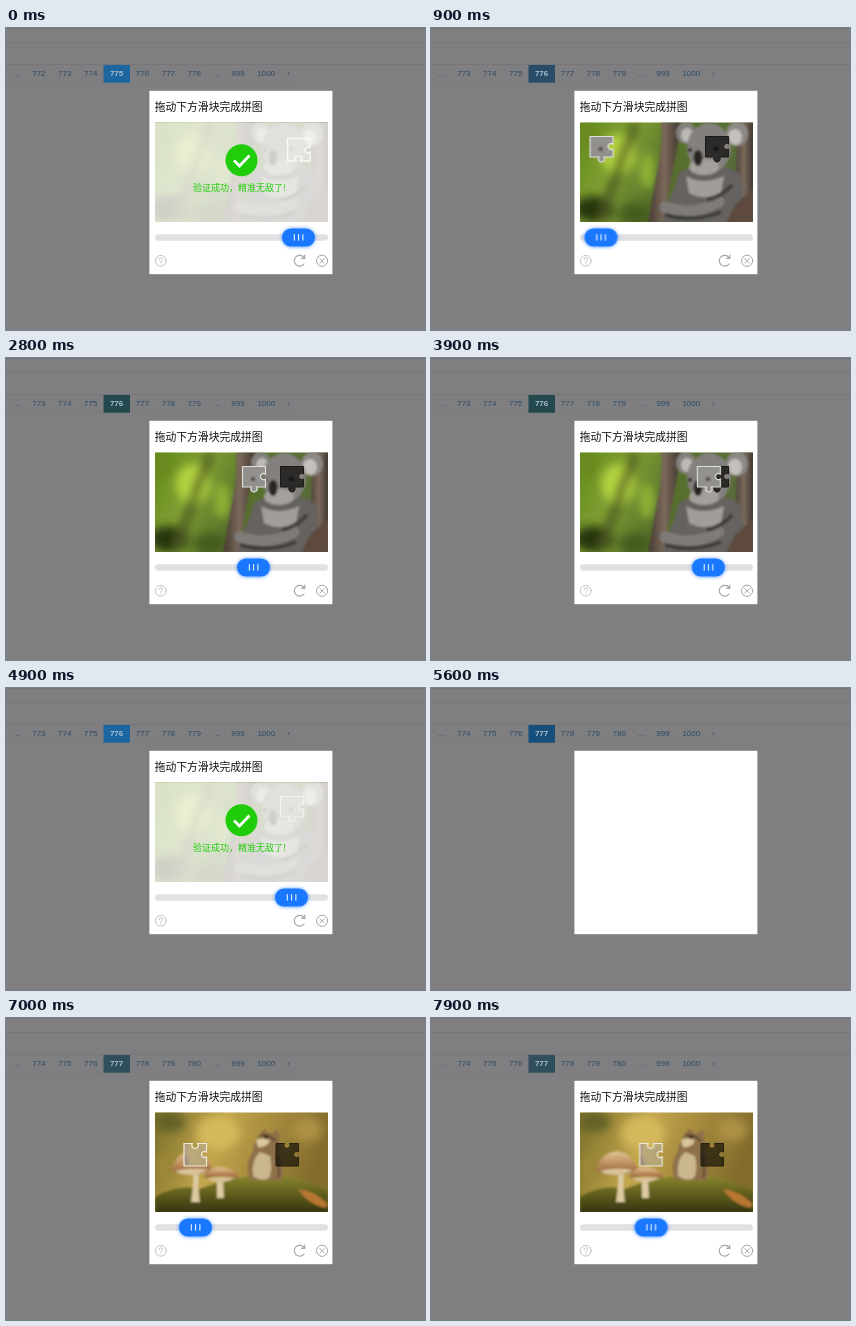
These frames come from a looping animation (419x302 px, 8 s). An HTML page:

```html
<!DOCTYPE html>
<html lang="zh">
<head>
<meta charset="utf-8">
<title>滑块拼图</title>
<style>
html, body { margin: 0; width: 100%; height: 100%; overflow: hidden; background: #7f7f81; }
svg { display: block; width: 419px; height: 302px; }
.pages text { font: 8px "Liberation Sans", Arial, sans-serif; text-anchor: middle; fill: #2b4a66; }
.pages .on { font-weight: bold; fill: #a9bccb; }
.zh { font-family: "Noto Sans CJK SC", "Noto Sans CJK", "Noto Sans", sans-serif; }
.icon { fill: none; stroke: #a6a6a6; stroke-width: 1; stroke-linecap: round; }
.help { stroke: #c2c2c2; }
.first, .second, .third, .p775, .p776, .p777, .tools, .done, .tab, .move {
  animation: 8s -10ms step-end infinite;
}
.p775, .first { animation-name: first; }
.p776 { animation-name: page2; }
.p777 { animation-name: page3; }
.second { animation-name: second; }
.third { animation-name: third; }
.tools { animation-name: tools; }
.done { animation-name: done; }
.tab { animation-name: tab; }
.move { animation-name: move; }
@keyframes first { 0% { opacity: 1 } 3.75%, 100% { opacity: 0 } }
@keyframes page2 { 0% { opacity: 0 } 3.75% { opacity: 1 } 70%, 100% { opacity: 0 } }
@keyframes page3 { 0% { opacity: 0 } 70%, 100% { opacity: 1 } }
@keyframes second { 0% { opacity: 0 } 7.5% { opacity: 1 } 70%, 100% { opacity: 0 } }
@keyframes third { 0% { opacity: 0 } 75%, 100% { opacity: 1 } }
@keyframes tools {
  0% { opacity: 1 } 3.75% { opacity: 0 } 7.5% { opacity: 1 }
  70% { opacity: 0 } 75%, 100% { opacity: 1 }
}
@keyframes done {
  0% { opacity: 1 } 3.75% { opacity: 0 }
  56.25% { opacity: .5 } 57.5% { opacity: 1 } 70%, 100% { opacity: 0 }
}
@keyframes tab {
  0% { fill: #1c66a2 } 3.75% { fill: #174f7c } 7.5% { fill: #2a4c68 } 30% { fill: #23484e }
  56.25% { fill: #1c66a2 } 70% { fill: #174f7c } 75%, 100% { fill: #314e5c }
}
/* drag distance, advancing every 100 ms */
@keyframes move {
  0% { transform: translateX(127px) }
  3.75% { transform: translateX(0) }
  10% { transform: translateX(0); animation-timing-function: steps(11) }
  23.75% { transform: translateX(49.5px); animation-timing-function: steps(9) }
  35% { transform: translateX(82px); animation-timing-function: steps(14) }
  52.5% { transform: translateX(120px) }
  70% { transform: translateX(0) }
  78.75% { transform: translateX(0); animation-timing-function: steps(7) }
  87.5% { transform: translateX(24px); animation-timing-function: steps(10) }
  100% { transform: translateX(58px) }
}
</style>
</head>
<body>
<svg viewBox="0 0 419 302">
  <defs>
    <filter id="soft" x="-30%" y="-30%" width="160%" height="160%"><feGaussianBlur stdDeviation="5"/></filter>
    <filter id="fur" x="-20%" y="-20%" width="140%" height="140%"><feGaussianBlur stdDeviation=".8"/></filter>
    <filter id="glow" x="-20%" y="-40%" width="140%" height="180%"><feGaussianBlur stdDeviation="1.8"/></filter>
    <linearGradient id="leaves" x2="1" y2=".3">
      <stop stop-color="#648a1c"/><stop offset=".3" stop-color="#7f9f33"/>
      <stop offset=".6" stop-color="#56702c"/><stop offset="1" stop-color="#586a3c"/>
    </linearGradient>
    <linearGradient id="bark"><stop stop-color="#453a31"/><stop offset=".5" stop-color="#7c6a5c"/><stop offset="1" stop-color="#3b322b"/></linearGradient>
    <linearGradient id="gold" x2="1" y2=".2">
      <stop stop-color="#7a702b"/><stop offset=".4" stop-color="#c2a54c"/><stop offset=".7" stop-color="#a4893c"/><stop offset="1" stop-color="#826c2d"/>
    </linearGradient>
    <linearGradient id="moss" x2="0" y2="1"><stop stop-color="#8d8a32"/><stop offset=".45" stop-color="#65631f"/><stop offset="1" stop-color="#33330f"/></linearGradient>
    <linearGradient id="cap" x2="0" y2="1"><stop stop-color="#e3c598"/><stop offset=".6" stop-color="#b98758"/><stop offset="1" stop-color="#875d39"/></linearGradient>
    <clipPath id="frame"><rect x="149" y="94.5" width="173" height="99.5"/></clipPath>

    <path id="pieceA" d="M274.5 108.5h23v7.5a3.1 3.1 0 1 0 0 5v8h-9a3.1 3.1 0 1 1-5 0h-9z"/>
    <path id="pieceB" d="M270 125.5h8.5a3.1 3.1 0 1 0 5 0h9v8.5a3.1 3.1 0 1 0 0 5v9h-22.5z"/>
    <clipPath id="cutA"><use href="#pieceA"/></clipPath>
    <clipPath id="cutB"><use href="#pieceB"/></clipPath>

    <g id="koala" clip-path="url(#frame)">
      <path fill="url(#leaves)" d="M149 94h173v100H149z"/>
      <g filter="url(#soft)">
        <ellipse cx="187" cy="126" rx="17" ry="20" fill="#b3d33f"/>
        <ellipse cx="216" cy="143" rx="8" ry="18" fill="#8fb236"/>
        <ellipse cx="157" cy="108" rx="10" ry="13" fill="#69891f"/>
        <ellipse cx="163" cy="181" rx="20" ry="13" fill="#28350e"/>
        <ellipse cx="204" cy="186" rx="16" ry="11" fill="#455b1c"/>
        <path fill="none" stroke="#4f5a24" stroke-width="8" d="M205 94l-14 36-20 60"/>
      </g>
      <g filter="url(#fur)">
        <path fill="url(#bark)" d="M307 94h16v101h-20z"/>
        <path fill="#65625f" d="M247 146C260 134 301 134 310 148L316 195H226C234 177 244 167 247 146z"/>
        <path fill="#a19d98" d="M255 148q17 10 38 0l-3 18q-18 7-32-1z"/>
        <path fill="url(#bark)" d="M230 94h20q-3 22-7 42l-11 58h-15l10-54q5-24 3-46z"/>
        <path fill="#5d4a3c" d="M323 160l-19 17-9 18h28z"/>
        <ellipse cx="255" cy="105" rx="10" ry="11" fill="#84807d"/>
        <ellipse cx="256" cy="107" rx="6" ry="7" fill="#bdb9b4"/>
        <ellipse cx="306" cy="106" rx="11" ry="12" fill="#8d8986"/>
        <ellipse cx="304" cy="109" rx="7" ry="8" fill="#c4c0bb"/>
        <ellipse cx="278" cy="120" rx="22" ry="25" fill="#83807d"/>
        <ellipse cx="273" cy="139" rx="15" ry="8" fill="#a5a09b"/>
        <ellipse cx="267" cy="130" rx="4.5" ry="8" fill="#292727"/>
        <circle cx="259" cy="122" r="2" fill="#231d19"/>
        <circle cx="285" cy="121" r="2.2" fill="#231d19"/>
        <path fill="none" stroke="#7f7b78" stroke-width="11" stroke-linecap="round" d="M288 174q-27 15-54 5"/>
        <path fill="none" stroke="#3f3c3a" stroke-width="4" d="M290 184q-28 11-56 3M301 157q-11 12-25 15"/>
      </g>
    </g>

    <g id="chipmunk" clip-path="url(#frame)">
      <path fill="url(#gold)" d="M149 94h173v100H149z"/>
      <g filter="url(#soft)">
        <ellipse cx="212" cy="115" rx="22" ry="17" fill="#d6b95b"/>
        <ellipse cx="164" cy="104" rx="15" ry="10" fill="#626025"/>
        <ellipse cx="301" cy="112" rx="15" ry="12" fill="#ad9144"/>
        <ellipse cx="160" cy="149" rx="11" ry="12" fill="#9c8739"/>
      </g>
      <g filter="url(#fur)">
        <path fill="url(#moss)" d="M149 179q23-13 45-8 24-9 44-12 32-7 55 2 15 5 29 12v22H149z"/>
        <path fill="#ddcaa2" d="M187 150h7q-3 18 0 34h-9q3-18 2-34zM211 160h6l1 20h-7z"/>
        <path fill="url(#cap)" d="M166 152q3-17 20-19 17 3 20 18-4 5-20 6-15 0-20-5z"/>
        <path fill="#d9c39b" d="M169 153q16-4 33-1-8 5-17 5-11 0-16-4zM201 161q13-3 27-1-6 4-14 4-8 0-13-3z"/>
        <path fill="url(#cap)" d="M198 160q3-10 16-11 15 1 18 11-16-4-34 0z"/>
        <path fill="#8d7048" d="M244 162q-6-17 3-28 0-8 5-15 3-6 7-8l3 4h5l4-4q4 5 2 11 3 6 0 12 8 14 2 29z"/>
        <path fill="#cbb78e" d="M247 158q-2-16 7-24l10 4q3 14-1 22-8 4-16-2z"/>
        <path fill="#dac69c" d="M250 122q8-4 14 1-4 7-12 6z"/>
        <path fill="none" stroke="#4b3a24" stroke-width="1.5" d="M254 118q8-3 16 5M270 137q5 11 2 23"/>
        <circle cx="260" cy="119" r="1.8" fill="#19120b"/>
        <path fill="#b77732" d="M292 171q17 2 30 15l-3 4q-18-4-27-19z"/>
      </g>
    </g>
  </defs>

  <path fill="#7f7f81" d="M0 0h419v302H0z"/>
  <path stroke="#777779" d="M0 .5h419M0 14.5h419M0 36.5h419"/>
  <path stroke="#78797b" stroke-width=".6" d="M0 54.7h290"/>
  <rect class="tab" x="97.5" y="37" width="26.5" height="17.7"/>
  <g id="pages"></g>

  <rect x="143.4" y="62.8" width="183" height="183.4" fill="#fff"/>

  <g class="first">
    <use href="#koala"/>
    <use href="#pieceB" transform="translate(11.5 258.5) scale(1 -1)" fill="#fff3" stroke="#fff" stroke-width="1.4"/>
  </g>
  <g class="second">
    <use href="#koala"/>
    <use href="#pieceA" fill="#000a" stroke="#1c1a19"/>
    <g transform="translate(-120)"><g class="move">
      <use href="#koala" clip-path="url(#cutA)"/>
      <use href="#pieceA" fill="#fff2" stroke="#dededc" stroke-width="1.2"/>
    </g></g>
  </g>
  <g class="third">
    <use href="#chipmunk"/>
    <use href="#pieceB" fill="#0009" stroke="#25210f"/>
    <g transform="translate(-116)"><g class="move">
      <use href="#chipmunk" clip-path="url(#cutB)"/>
      <use href="#pieceB" fill="#fff5" stroke="#ecead8" stroke-width="1.2"/>
    </g></g>
  </g>

  <g class="done">
    <rect x="149" y="94.5" width="173" height="99.5" fill="#f8f8f6" fill-opacity=".8"/>
    <circle cx="235.5" cy="132.3" r="16" fill="#20cd0b"/>
    <path d="M228 132.5l5.5 5.5 10-10.5" fill="none" stroke="#fff" stroke-width="2.8"/>
    <text class="zh" x="187" y="163.3" font-size="9" fill="#20cd0b">验证成功，精准无敌了!</text>
  </g>

  <g class="tools">
    <text class="zh" x="148.7" y="83" font-size="10.8" fill="#111">拖动下方滑块完成拼图</text>
    <rect x="149" y="206.2" width="173" height="6.6" rx="3.3" fill="#e1e1e3"/>
    <g class="move">
      <rect x="148" y="199.5" width="35" height="20.4" rx="10.2" fill="#1a78ff" opacity=".45" filter="url(#glow)"/>
      <rect x="149" y="200.4" width="33" height="18.2" rx="9.1" fill="#1a78ff"/>
      <path stroke="#fff" d="M161.3 206.2v6.4M165.6 206.2v6.4M169.9 206.2v6.4"/>
    </g>
    <g class="icon">
      <g class="help">
        <circle cx="154.8" cy="232.8" r="5.4"/>
        <path d="M153 231.6q.1-1.9 1.8-1.9 1.8.1 1.8 1.7 0 1-1 1.5-.8.4-.8 1.4M154.8 235.9v.1"/>
      </g>
      <path stroke-width="1.2" d="M298 236a5.4 5.4 0 1 1 .2-6.2M298.8 227.2v3.2h-3.2"/>
      <circle cx="316.1" cy="232.8" r="5.6"/>
      <path d="M313.9 230.6l4.4 4.4M318.3 230.6l-4.4 4.4"/>
    </g>
  </g>
</svg>
<script>
const row = document.getElementById('pages');
const label = (text, x, cls = '') => `<text class="${cls}" x="${x}" y="48.3">${text}</text>`;

for (const page of [775, 776, 777]) {
  let items = label('…', 10.5) + label('…', 210.5) + label('999', 232) + label('1000', 260.3) + label('›', 282.5);
  for (let k = -3; k <= 3; k++) items += label(page + k, 110.6 + k * 25.9, k ? '' : 'on');
  row.innerHTML += `<g class="pages p${page}">${items}</g>`;
}
</script>
</body>
</html>
```
